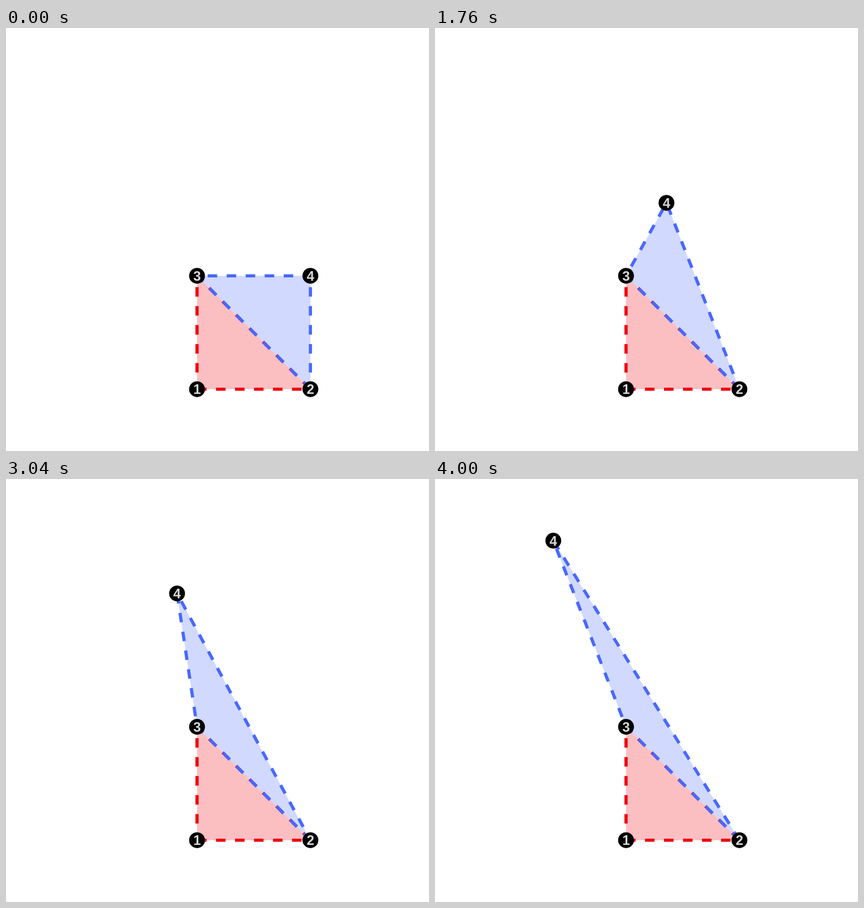
Write an HTML page that moves like this. It is 748 px wide and 748 px high and loops after 4040 ms.

```html
<!DOCTYPE html>
<html lang="en">
<head>
<meta charset="utf-8">
<title>Two triangles</title>
<style>
  html, body { margin: 0; width: 100%; height: 100%; overflow: hidden; background: #fff; }
  svg { display: block; width: 100%; height: 100%; }
  path { stroke-width: 5.6; stroke-dasharray: 16.8; fill-opacity: .25; }
  .red { fill: #f0000f; stroke: #f0000f; }
  .blue { fill: #4868ff; stroke: #4868ff; }
  text {
    font: bold 24px "Liberation Sans", Arial, sans-serif;
    fill: #d9d9d9;
    text-anchor: middle;
  }
</style>
</head>
<body>
<svg viewBox="0 0 748 748"></svg>
<script>
  const STEP = 40, STEPS = 101;
  const LEFT = 337.8, RIGHT = 538.3, TOP = 438.2, BOTTOM = 638.7;
  const svg = document.querySelector("svg");

  function add(parent, tag, attributes = {}) {
    const node = document.createElementNS("http://www.w3.org/2000/svg", tag);
    for (const name in attributes) node.setAttribute(name, attributes[name]);
    return parent.appendChild(node);
  }

  const triangle = (...corners) => `M${corners.join("L")}Z`;

  function addVertex(label, [x, y]) {
    const group = add(svg, "g", { transform: `translate(${x} ${y})` });
    add(group, "circle", { r: 14 });
    add(group, "text", { y: 8.6 }).textContent = label;
    return group;
  }

  const p1 = [LEFT, BOTTOM], p2 = [RIGHT, BOTTOM], p3 = [LEFT, TOP], p4 = [RIGHT, TOP];
  add(svg, "path", { class: "red", d: triangle(p1, p2, p3) });
  const blue = add(svg, "path", { class: "blue" });
  const [, , , vertex4] = [p1, p2, p3, p4].map((p, i) => addVertex(i + 1, p));

  // The fourth vertex slides up the diagonal, gently accelerating.
  function draw(time) {
    const n = Math.floor(time / STEP) % STEPS;
    const shift = 2.845 * n + 4.46e-5 * n ** 3;
    const tip = [RIGHT - shift, TOP - shift];
    blue.setAttribute("d", triangle(p2, p3, tip));
    vertex4.setAttribute("transform", `translate(${tip})`);
  }

  const start = performance.now();
  function tick() {
    draw(performance.now() - start);
    requestAnimationFrame(tick);
  }
  tick();
</script>
</body>
</html>
```
